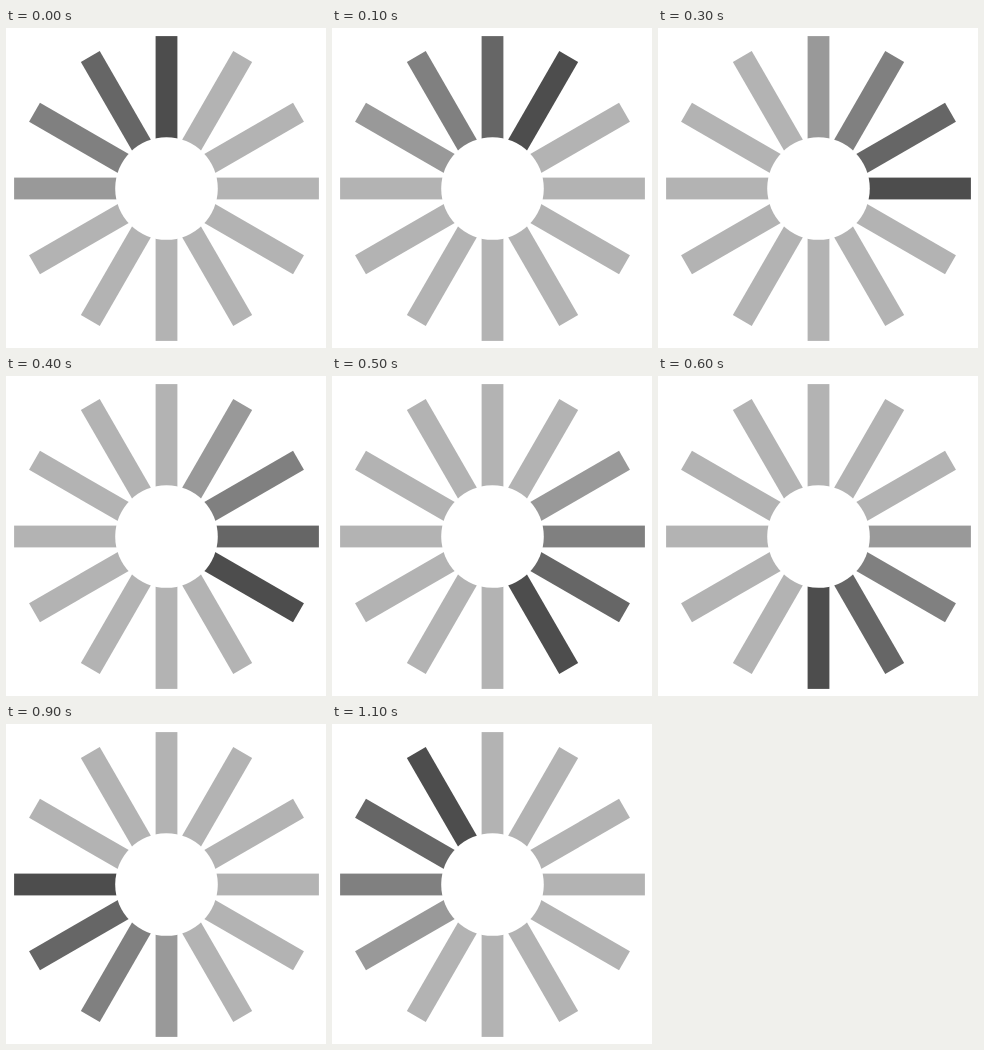
Animation of 320x320 px, one loop 1200 ms. Source, as an HTML page:

```html
<!DOCTYPE html>
<html lang="en">
<head>
<meta charset="utf-8">
<title>Spinner</title>
<style>
  html, body { margin: 0; width: 100%; height: 100%; overflow: hidden; background: #fff; }
  svg { display: block; width: 100vw; height: 100vh; }
</style>
</head>
<body>
<svg viewBox="0 0 320 320">
  <g id="bars"></g>
  <circle cx="160.5" cy="160.5" r="51.3" fill="#fff"/>
</svg>
<script>
  const COUNT = 12;
  const STEP = 100;
  const SHADES = ['#4d4d4d', '#666', '#808080', '#999'];
  const REST = '#b3b3b3';

  const group = document.getElementById('bars');
  const bars = Array.from({ length: COUNT }, (_, i) => {
    const bar = document.createElementNS('http://www.w3.org/2000/svg', 'rect');
    const attrs = {
      x: 149.6, y: 8.1, width: 21.8, height: 104,
      transform: `rotate(${i * 360 / COUNT} 160.5 160.5)`
    };
    for (const name in attrs) bar.setAttribute(name, attrs[name]);
    return group.appendChild(bar);
  });

  // The darkest bar leads clockwise; the bars behind it fade in fixed steps.
  function draw(time) {
    const lead = Math.floor(time / STEP) % COUNT;
    bars.forEach((bar, i) => {
      const age = (lead - i + COUNT) % COUNT;
      bar.setAttribute('fill', SHADES[age] || REST);
    });
  }

  const start = performance.now();
  function tick() {
    draw(performance.now() - start);
    requestAnimationFrame(tick);
  }
  tick();
</script>
</body>
</html>
```
